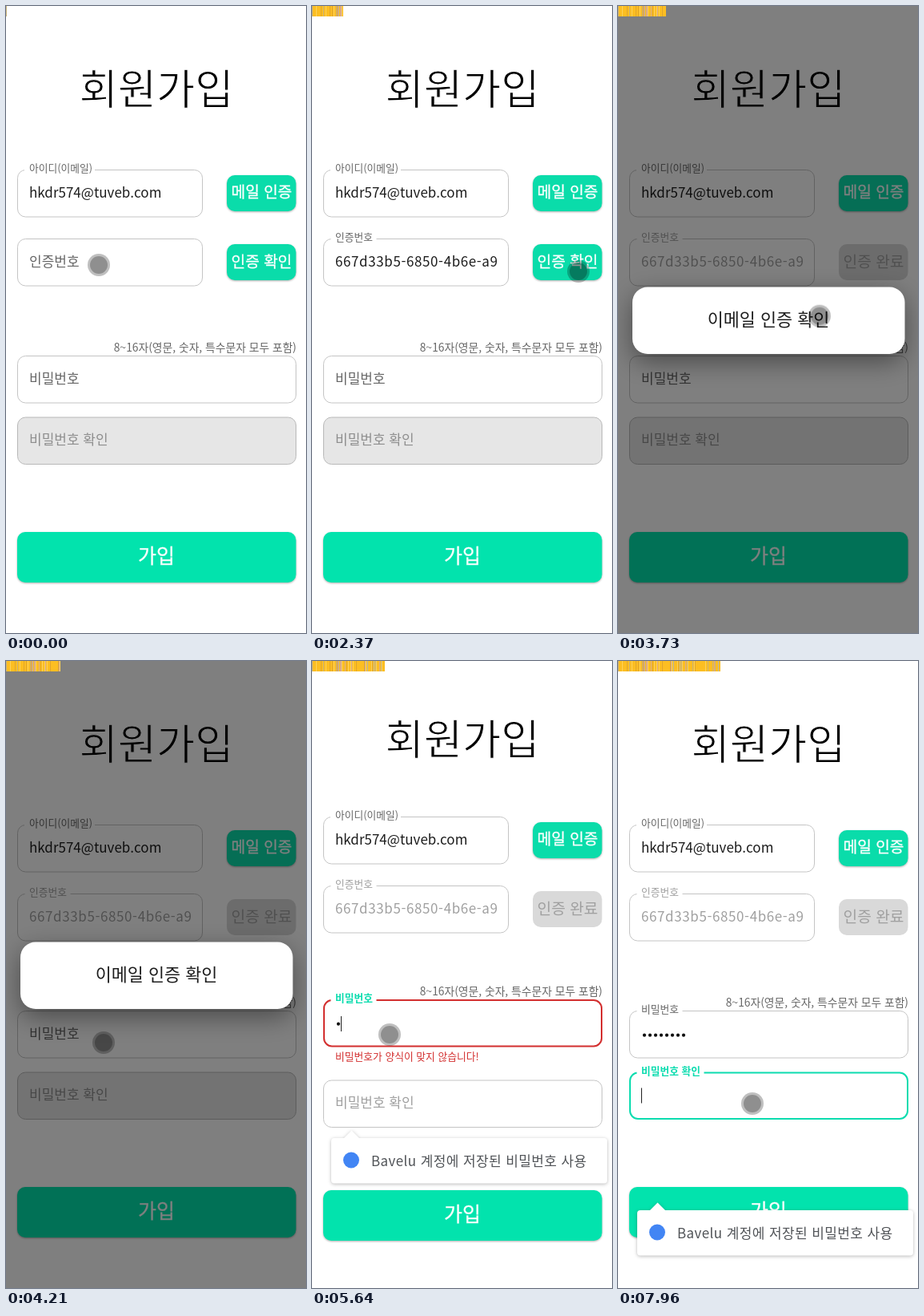
An HTML page for the animation above (8000 ms loop, 375 by 782 pixels).

```html
<!DOCTYPE html>
<html lang="ko">
<head>
<meta charset="utf-8">
<title>회원가입</title>
<style>
  html, body { margin: 0; width: 100%; height: 100%; overflow: hidden; background: #fff; }
  svg { position: absolute; left: 0; top: 0; }
  text { font-family: "Noto Sans CJK KR", "Noto Sans CJK", sans-serif; font-weight: 350; white-space: pre; }
  .title { font-weight: 300; stroke: #fff; stroke-width: 1.1px; }
  .onButton { stroke: #fff; stroke-width: .3px; }
  .button { fill: #0adcaa; filter: drop-shadow(0 1.5px 1.2px rgba(0, 0, 0, .32)); }
  .main { fill: #02e3ad; }
  .popup { filter: drop-shadow(0 1px 2px rgba(0, 0, 0, .28)); }
  .dialog { filter: drop-shadow(0 10px 16px rgba(0, 0, 0, .42)); }
  #strip { position: absolute; left: 0; top: 0; height: 13px; overflow: hidden; background-size: 128px 13px; }
</style>
</head>
<body>
<svg id="stage" width="375" height="782"></svg>
<div id="strip"></div>
<svg id="top" width="375" height="782"></svg>
<script>
const LOOP = 8000;
const TEAL = '#0cdcaf', RED = '#d32f2f', LINE = '#c4c4c4', LABEL = '#666', FAINT = '#a0a0a0', INK = '#1c1c1c';
const T = { focusCode: 230, paste: 640, blurCode: 1750, verified: 3500, dismiss: 4350,
            focusPass: 5200, invalid: 5450, valid: 6930, focusConfirm: 7740 };
const KEYS = [T.invalid, 5900, 6050, 6200, 6350, 6500, 6700, T.valid];
const stage = document.getElementById('stage');

function add(parent, tag, attrs = {}, content = '') {
  const node = document.createElementNS('http://www.w3.org/2000/svg', tag);
  for (const name in attrs) node.setAttribute(name, attrs[name]);
  node.textContent = content;
  return parent.appendChild(node);
}
const group = (parent = stage, attrs) => add(parent, 'g', attrs);
const box = (parent, x, y, width, height, rx, attrs) =>
  add(parent, 'rect', { x, y, width, height, rx, ...attrs });
const write = (parent, x, y, size, content, attrs) =>
  add(parent, 'text', { x, y, 'font-size': size, fill: INK, ...attrs }, content);

// steps: [[ms, value], ...]; the last value holds to the end of the loop
function track(node, prop, steps, easing = 'linear') {
  const frames = [...steps, [LOOP, steps.at(-1)[1]]]
    .map(([ms, value]) => ({ offset: ms / LOOP, [prop]: value, easing }));
  return node.animate(frames, { duration: LOOP, iterations: Infinity });
}
const hard = (node, prop, steps) => track(node, prop, steps, 'steps(1, end)');
const show = (node, from, to = LOOP) =>
  hard(node, 'opacity', [[0, from ? 0 : 1], ...(from ? [[from, 1]] : []), ...(to < LOOP ? [[to, 0]] : [])]);
function styleSteps(node, steps) {
  for (const prop of Object.keys(steps[0][1])) hard(node, prop, steps.map(([ms, s]) => [ms, s[prop]]));
}

// a block that moves while the validation message takes up room
function block(dy) {
  const g = group();
  hard(g, 'transform', [[0, 'none'], [T.invalid, `translateY(${dy}px)`], [T.valid, 'none']]);
  return g;
}

// borders: [[ms, colour, weight], ...]; the border grows inwards
function field(parent, y, width, borders, fill = '#fff') {
  const rect = box(parent, 14.5, y + .5, width - 1, 58.5, 10, { fill, stroke: LINE });
  if (borders) styleSteps(rect, borders.map(([ms, stroke, weight]) => [ms, {
    stroke, strokeWidth: `${weight}px`,
    x: `${14 + weight / 2}px`, y: `${y + weight / 2}px`,
    width: `${width - weight}px`, height: `${59.5 - weight}px`
  }]));
  return rect;
}
function floatingLabel(parent, y, content, floatAt, notchWidth) {
  const notch = box(parent, 23.5, y - 2, notchWidth, 5, 0, { fill: '#fff' });
  show(notch, floatAt);
  const label = write(parent, 0, 0, 17, content, { fill: LABEL });
  const rest = `translate(29px, ${y + 34.5}px) scale(1)`;
  const up = `translate(29px, ${y + 3}px) scale(.75)`;
  track(label, 'transform', [[0, rest], [floatAt, rest], [floatAt + 180, up]], 'ease-out');
  return label;
}
const plain = fill => ({ fill, fontWeight: 350 });
const active = { fill: TEAL, fontWeight: 600 };

const smallButton = (parent, y, attrs = { class: 'button' }) =>
  box(parent, 276, y, 86.5, 45, 10, attrs);
const buttonText = (parent, y, content, attrs) =>
  write(parent, 319.5, y, 19.2, content, { 'text-anchor': 'middle', ...attrs });
const white = { fill: '#fff', class: 'onButton' };
const caret = (parent, x, y) =>
  add(parent, 'path', { d: `M${x} ${y}v19`, stroke: '#222', 'stroke-width': 1 });

// heading
write(block(-6), 188, 122.5, 52.5, '회원가입', { 'text-anchor': 'middle', fill: '#000', class: 'title' });

// e-mail
const mail = block(-10);
field(mail, 204, 232);
box(mail, 23, 202, 88, 5, 0, { fill: '#fff' });
write(mail, 29, 207, 12.75, '아이디(이메일)', { fill: LABEL });
write(mail, 29, 239, 17, 'hkdr574@tuveb.com');
smallButton(mail, 211);
buttonText(mail, 239, '메일 인증', white);

// verification code
const code = block(-10);
field(code, 290, 232, [[0, LINE, 1], [T.focusCode, TEAL, 2], [T.blurCode, LINE, 1]]);
styleSteps(floatingLabel(code, 290, '인증번호', T.focusCode, 57), [
  [0, plain(LABEL)], [T.focusCode, active], [T.blurCode, plain(LABEL)], [T.verified, plain(FAINT)]]);
box(add(code, 'clipPath', { id: 'codeClip' }), 29, 300, 203, 40, 0);
const codeText = group(code, { 'clip-path': 'url(#codeClip)' });
const VALUE = '667d33b5-6850-4b6e-a910-1f200a00bebb';
const spaced = { 'letter-spacing': .6 };
const codeEnd = group(codeText);
write(codeEnd, 232, 325, 17, VALUE, { ...spaced, 'text-anchor': 'end' });
for (const [from, to] of [[30, 61], [70, 111], [119, 230]]) {
  let d = `M${from} 328`;
  for (let x = from + 2, i = 0; x <= to; x += 2, i++) d += `L${x} ${i % 2 ? 328 : 326}`;
  add(codeEnd, 'path', { d, fill: 'none', stroke: '#f03a3a', 'stroke-width': 1 });
}
caret(codeEnd, 231.5, 310);
show(codeEnd, T.paste, T.blurCode);
const codeStart = write(codeText, 29, 325, 17, VALUE, spaced);
show(codeStart, T.blurCode);
hard(codeStart, 'fill', [[0, INK], [T.verified, FAINT]]);
show(caret(code, 30, 310), T.focusCode, T.paste);

const verify = group(code);
smallButton(verify, 297);
buttonText(verify, 326, '인증 확인', white);
show(verify, 0, T.verified);
const verified = group(code);
smallButton(verified, 297, { fill: '#d9d9d9' });
buttonText(verified, 326, '인증 완료', { fill: FAINT });
show(verified, T.verified);

// password
const pass = block(-14);
write(pass, 363, 430.5, 13.8, '8~16자(영문, 숫자, 특수문자 모두 포함)', { fill: LABEL, 'text-anchor': 'end' });
field(pass, 436, 349, [[0, LINE, 1], [T.focusPass, TEAL, 2], [T.invalid, RED, 2],
  [T.valid, TEAL, 2], [T.focusConfirm, LINE, 1]]);
styleSteps(floatingLabel(pass, 436, '비밀번호', T.focusPass, 57), [
  [0, plain(LABEL)], [T.focusPass, active], [T.focusConfirm, plain(LABEL)]]);
KEYS.forEach((ms, i) => show(add(pass, 'circle', { cx: 33 + 7 * i, cy: 466.7, r: 2.1, fill: '#111' }), ms));
const passCaret = caret(pass, 29.5, 457);
show(passCaret, T.focusPass, T.focusConfirm);
hard(passCaret, 'transform', [[0, 'none'], ...KEYS.map((ms, i) => [ms, `translateX(${7 + 7 * i}px)`])]);
show(write(pass, 29, 512, 12.8, '비밀번호가 양식이 맞지 않습니다!', { fill: RED }), T.invalid, T.valid);

// password again
const confirm = block(10);
const confirmField = field(confirm, 512.5, 349,
  [[0, '#b8b8b8', 1], [T.invalid, LINE, 1], [T.focusConfirm, TEAL, 2]], '#e6e6e6');
hard(confirmField, 'fill', [[0, '#e6e6e6'], [T.invalid, '#fff']]);
styleSteps(floatingLabel(confirm, 512.5, '비밀번호 확인', T.focusConfirm, 84), [
  [0, plain('#8e8e8e')], [T.invalid, plain(FAINT)], [T.valid, plain('#707070')], [T.focusConfirm, active]]);
show(caret(confirm, 29.5, 532.5), T.focusConfirm);

// join
const join = block(4);
box(join, 14, 656, 348.5, 63, 10, { class: 'button main' });
write(join, 188, 694.5, 25, '가입', { 'text-anchor': 'middle', ...white });

// saved password hint
const hint = group();
const hintBody = group(hint, { class: 'popup' });
box(hintBody, 24, 595, 345, 56.5, 4, { fill: '#fff' });
add(hintBody, 'path', { d: 'M39 596L49.5 585.5L60 596Z', fill: '#fff' });
add(hint, 'circle', { cx: 49, cy: 622.5, r: 10, fill: '#4285f4' });
write(hint, 74, 629.5, 17, 'Bavelu 계정에 저장된 비밀번호 사용', { fill: '#505357', 'letter-spacing': .4 });
hard(hint, 'opacity', [[0, 0], [T.focusPass + 60, 1], [T.valid, 0], [T.focusConfirm + 60, 1]]);
hard(hint, 'transform', [[0, 'translateY(14px)'], [T.invalid, 'none'], [T.valid, 'translateY(90px)']]);

// dialog
const modal = group();
box(modal, 0, 0, 375, 782, 0, { fill: '#000', opacity: .5 });
box(modal, 18, 350.5, 340.5, 83.5, 19, { fill: '#fff', class: 'dialog' });
write(modal, 188, 399, 21.8, '이메일 인증 확인', { 'text-anchor': 'middle' });
track(modal, 'opacity', [[0, 0], [T.verified, 0], [T.verified + 220, 1], [T.dismiss, 1], [T.dismiss + 200, 0]], 'ease-in-out');

// progress strip with seeded stripes
const strip = document.getElementById('strip');
let seed = 11;
const random = () => (seed = seed * 16807 % 2147483647) / 2147483647;
const shades = ['#e0a52c', '#c9b27a', '#fdd25a', '#b9b6a4', '#d9a98a'];
const stops = Array.from({ length: 128 }, (_, x) => {
  const shade = x && random() < .7 ? '#fcbe22' : shades[x ? Math.floor(random() * 5) : 1];
  return `${shade} ${x}px ${x + 1}px`;
});
strip.style.backgroundImage = `linear-gradient(90deg, ${stops})`;
strip.animate({ width: ['1px', '128.5px'] }, { duration: LOOP, iterations: Infinity });

// touch pointer
const pointer = add(document.getElementById('top'), 'g');
add(pointer, 'circle', { r: 14, fill: '#000', opacity: .25 });
add(pointer, 'circle', { r: 11, fill: '#000', opacity: .25 });
const at = (x, y) => `translate(${x}px, ${y}px)`;
track(pointer, 'transform', [
  [0, at(116, 323)], [800, at(116, 323)], [1380, at(325, 335)], [1440, at(325, 335)],
  [1630, at(332, 332)], [2400, at(333, 331)], [3420, at(333, 331)], [4140, at(122, 476)],
  [4800, at(122, 476)], [5150, at(97, 466)], [7400, at(97, 466)], [7700, at(168, 552)]
], 'ease-in-out');
</script>
</body>
</html>
```
